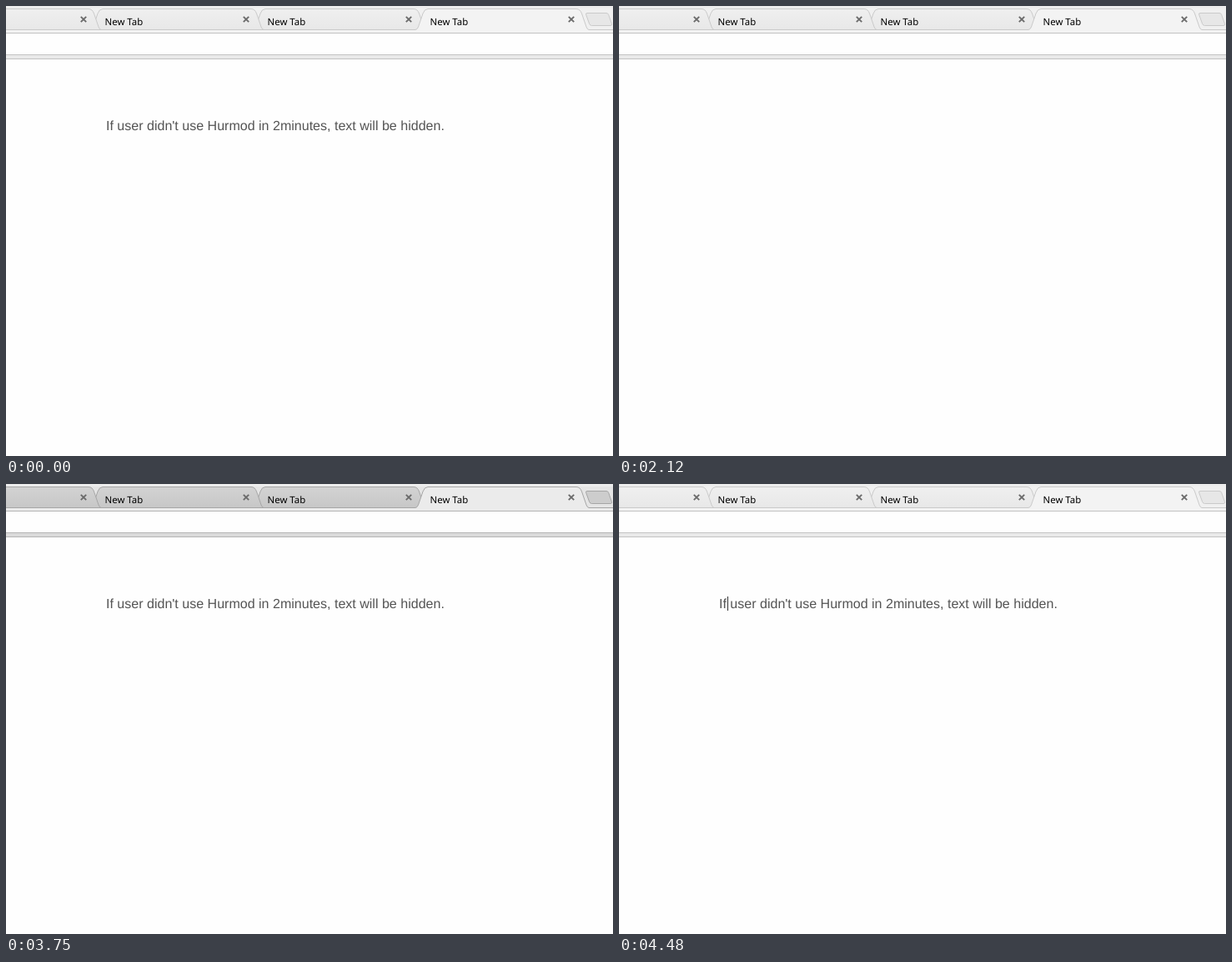
Write an HTML page that moves like this. It is 728 by 540 pixels and loops after 4560 ms.

```html
<!DOCTYPE html>
<html lang="en">
<head>
<meta charset="utf-8">
<title>Idle text hiding</title>
<style>
html, body { margin: 0; width: 100%; height: 100%; overflow: hidden; background: #fefefe; }
svg { display: block; width: 728px; height: 540px; }

.stage {
  --strip: #f0f0f0; --tab-a: #efefef; --tab-b: #e8e8e8;
  --front: #f3f3f3; --edge: #cacaca; --rule: #c2c2c2;
  --band: #e9e9e9; --plus: #e7e7e7;
  animation: focus 4560ms step-end infinite;
}
.strip { fill: var(--strip); }
.back { fill: url(#shade); stroke: var(--edge); }
.front { fill: var(--front); stroke: var(--edge); }
.bar { fill: var(--front); }
.band { fill: var(--band); }
.rule { fill: var(--rule); }
.line { fill: none; stroke: var(--edge); }
.plus { fill: var(--plus); stroke: var(--edge); }
.close { fill: none; stroke: #6a6a6a; stroke-width: 1.9; }
text { text-rendering: geometricPrecision; }
.label { font: 500 11.4px "Noto Sans", "Open Sans", sans-serif; fill: #000; }
.message {
  font: 16.05px "Liberation Sans", Arial, sans-serif;
  fill: #545454;
  animation: hide 4560ms step-end infinite;
}
.caret { fill: #333; animation: caret 4560ms step-end infinite; }

/* Window gains focus, then loses it again */
@keyframes focus {
  69.298% {
    --strip: #e5e5e5; --tab-a: #d3d3d3; --tab-b: #c7c7c7;
    --front: #ebebeb; --edge: #a6a6a6; --rule: #b4b4b4;
    --band: #dadada; --plus: #cdcdcd;
  }
  98.245% {
    --strip: #f0f0f0; --tab-a: #efefef; --tab-b: #e8e8e8;
    --front: #f3f3f3; --edge: #cacaca; --rule: #c2c2c2;
    --band: #e9e9e9; --plus: #e7e7e7;
  }
}
@keyframes hide {
  0% { filter: none; opacity: 1; }
  42.543% { filter: blur(.8px); opacity: 1; }
  46.491% { filter: none; opacity: 0; }
  78.947% { filter: blur(1.5px); opacity: 1; }
  82.236%, 100% { filter: none; opacity: 1; }
}
@keyframes caret {
  0% { opacity: 0; }
  91.885%, 100% { opacity: 1; }
}
</style>
</head>
<body>
<svg class="stage" viewBox="0 0 728 540">
  <defs>
    <linearGradient id="shade" x1="0" y1="0" x2="0" y2="1">
      <stop offset="0" style="stop-color: var(--tab-a)"/>
      <stop offset="1" style="stop-color: var(--tab-b)"/>
    </linearGradient>
    <path id="tab" d="M0 28.5Q2.5 28 3.5 25L9 9Q11 3.5 15 3.5H193Q197.5 3.5 199.5 9L205 25Q206 28 208 28.5"/>
    <path id="cross" d="M-3.2 -3.2L3.2 3.2M3.2 -3.2L-3.2 3.2"/>
  </defs>

  <rect width="728" height="540" fill="#fefefe"/>
  <rect class="strip" width="728" height="29"/>
  <rect width="728" height="3" fill="#ededed"/>

  <use href="#tab" class="back" x="296"/>
  <use href="#tab" class="back" x="101"/>
  <use href="#tab" class="back" x="-94"/>
  <path class="line" d="M0 28.5H491M699 28.5H728"/>
  <path class="plus" d="M697 8.5H720Q722 8.5 722.7 10.5L726.5 21.5Q727 23.5 725 23.5H702.5Q700.5 23.5 699.7 21.5L695.7 10.5Q695 8.5 697 8.5Z"/>

  <rect class="bar" y="29" width="728" height="3"/>
  <use href="#tab" class="front" x="491"/>
  <rect class="bar" x="493" y="28" width="204" height="2"/>

  <rect class="rule" y="32" width="728" height="1"/>
  <rect class="rule" y="58" width="728" height="1"/>
  <rect class="band" y="59" width="728" height="4"/>
  <rect class="rule" y="63" width="728" height="1"/>

  <g class="close">
    <use href="#cross" x="93" y="16"/>
    <use href="#cross" x="288" y="16"/>
    <use href="#cross" x="483" y="16"/>
    <use href="#cross" x="678" y="16"/>
  </g>
  <g class="label">
    <text x="118.6" y="23">New Tab</text>
    <text x="313.6" y="23">New Tab</text>
    <text x="508.6" y="23">New Tab</text>
  </g>

  <text class="message" x="120" y="149">If user didn't use Hurmod in 2minutes, text will be hidden.</text>
  <rect class="caret" x="130" y="135" width="1" height="17"/>
</svg>
</body>
</html>
```
